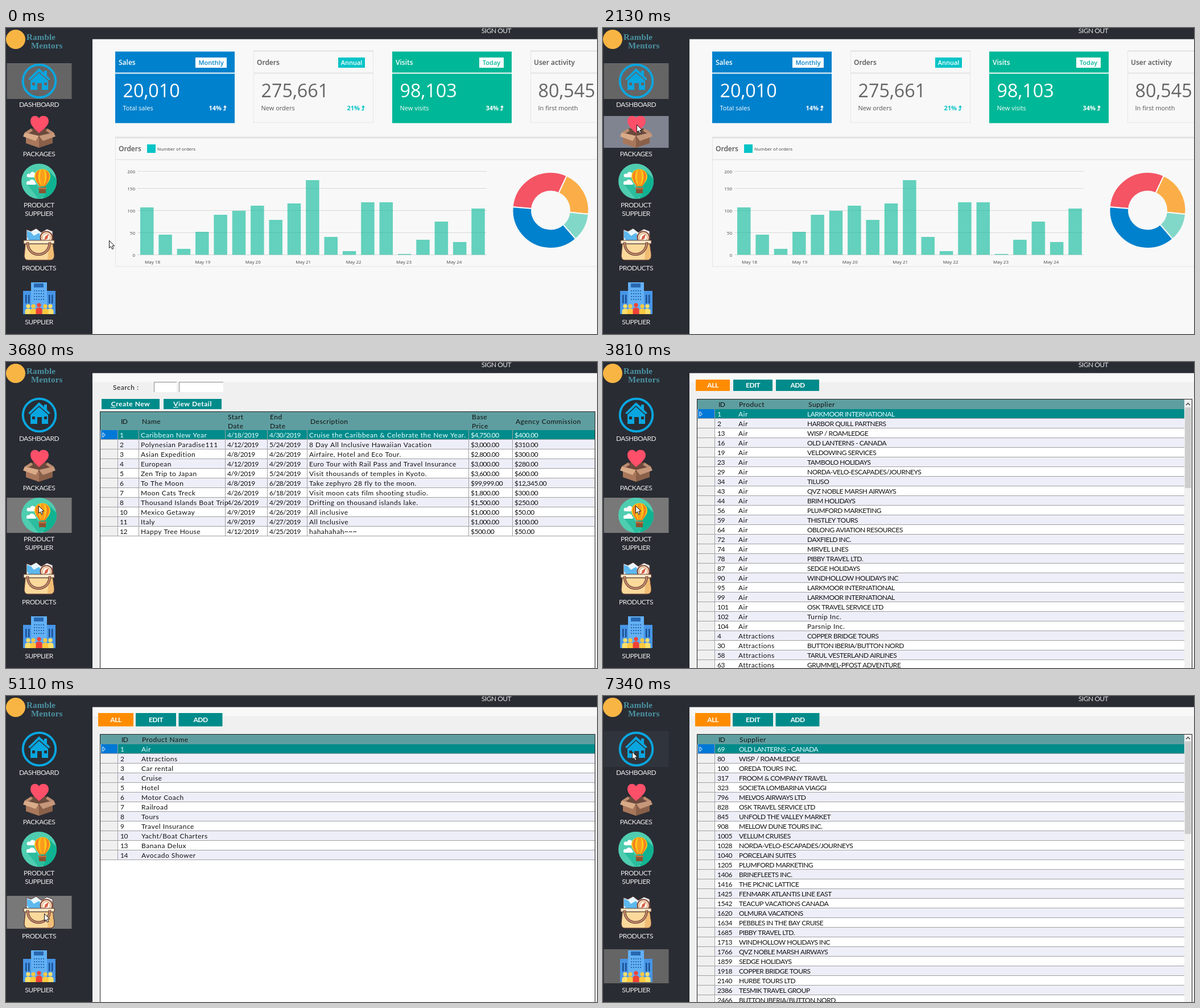
An HTML page with a canvas that plays this animation: 1039 by 539 pixels, repeating every 8000 ms.

```html
<!DOCTYPE html>
<html lang="en">
<head>
<meta charset="utf-8">
<title>Travel agency desktop</title>
<style>
html, body { margin: 0; width: 100%; height: 100%; overflow: hidden; background: #292c33; }
canvas { display: block; }
</style>
</head>
<body>
<canvas id="stage" width="1039" height="539"></canvas>
<script>
const ctx = document.getElementById('stage').getContext('2d');
const LOOP = 8000;
const DARK = '#292c33', TEAL = '#008b8b', BLUE = '#0081cd', GREEN = '#00b797', CYAN = '#06c4c7';

// ---------- drawing helpers ----------
function box(x, y, w, h, color) {
  ctx.fillStyle = color;
  ctx.fillRect(x, y, w, h);
}
function shape(d, fill, stroke, width = 1) {
  const path = new Path2D(d);
  if (fill) { ctx.fillStyle = fill; ctx.fill(path, 'evenodd'); }
  if (stroke) { ctx.strokeStyle = stroke; ctx.lineWidth = width; ctx.stroke(path); }
}
function disc(x, y, r, fill, stroke, width = 1) {
  ctx.beginPath();
  ctx.arc(x, y, r, 0, 7);
  if (fill) { ctx.fillStyle = fill; ctx.fill(); }
  if (stroke) { ctx.strokeStyle = stroke; ctx.lineWidth = width; ctx.stroke(); }
}
function write(s, x, y, font, color, align, spacing) {
  ctx.font = font;
  ctx.fillStyle = color;
  ctx.textAlign = align;
  ctx.letterSpacing = spacing + 'px';
  ctx.fillText(s, x, y);
}
// Geometric interface text: looser lowercase, tighter capitals and digits
function label(s, x, y, color = '#111', weight = 400, align = 'left') {
  write(s, x, y, `${weight} 12px Lato, sans-serif`, color, align, /[a-z]/.test(s) ? 0.5 : -0.5);
}
function sans(s, x, y, size, color, weight = 400, align = 'left') {
  write(s, x, y, `${weight} ${size}px "Open Sans", sans-serif`, color, align, 0);
}

// ---------- sidebar ----------
function homeIcon() {
  disc(58.5, 93.5, 28.8, null, '#0aa6df', 4);
  shape('M58 71 L67 79 V75 H72 V84 L78 90 L75 92 L58 77 L42 92 L39 90 Z', '#0aa6df');
  shape('M58 79 L74 93 V109 H43 V93 Z M55 97 H63 V109 H55 Z M46 96 H51 V101 H46 Z M67 96 H72 V101 H67 Z', '#0aa6df');
}
function packageIcon() {
  shape('M45 177 H72 L85 186 L58 194 L32 186 Z', '#6b4a3d');
  shape('M58 185 C51 178 43 172 43 164 C43 154 54 152 58 159 C62 152 75 154 75 164 C75 172 66 178 58 185 Z', '#ff4f69');
  shape('M35 188 L58 193 V211 L35 203 Z', '#a9775b');
  shape('M82 188 L58 193 V211 L82 203 Z', '#8a6049');
  shape('M33 184 L58 190 L52 199 L30 191 Z', '#d9ab88');
  shape('M84 184 L58 190 L65 199 L87 191 Z', '#c6977a');
  shape('M33 184 L44 177 L47 181 L39 186 Z M84 184 L73 177 L70 181 L78 186 Z', '#bd8d70');
}
function balloonIcon() {
  disc(58, 270, 31, '#4fcdb0');
  ctx.save();
  ctx.beginPath();
  ctx.arc(58, 270, 31, 0, 7);
  ctx.clip();
  shape('M74 251 L100 277 V310 H77 L57 290 Z', '#0fb391');
  shape('M36 274 H51 L70 294 L58 302 Z', '#2cbd9e');
  ctx.restore();
  shape('M37 262 C35 257 41 255 42 258 C43 251 53 253 51 259 C54 260 53 263 51 263 H39 Z', '#fff');
  shape('M37 276 C34 272 38 268 41 270 C43 264 52 268 51 272 C54 273 53 276 51 276 Z', '#fff');
  shape('M59 276 L61 284 M69 276 L67 284', null, '#8a5a3b');
  shape('M50 262 C50 244 78 244 78 262 C78 269 71 275 69 279 H59 C57 275 50 269 50 262 Z', '#ffc61a');
  shape('M55 253 C50 258 51 266 59 279 H62 C55 268 55 257 60 249 Z M73 253 C78 258 77 266 69 279 H66 C73 268 73 257 68 249 Z', '#f5821f');
  shape('M62 249 H66 C69 258 68 270 66 279 H62 C60 270 59 258 62 249 Z', '#fb9d1c');
  box(58, 282, 12, 9, '#8b5330');
  box(57, 281, 14, 3, '#b8713f');
}
function bagIcon() {
  const line = '#5b3a35';
  shape('M36 375 V355 L44 358 L53 353 L62 360 L72 354 L82 358 V377 Z', '#eaf6fd', line);
  shape('M37 369 V357 L44 360 L49 366 L58 361 L64 370 L58 376 H42 Z', '#5db8ee');
  disc(71, 369, 10.5, '#fbe3c2', '#8a4b3a', 2);
  disc(71, 369, 7, '#fff6e6', '#c98b68');
  shape('M75 363 L73 371 L67 374 L69 367 Z', '#d8604c');
  shape('M34 380 H82 L85 400 C85 406 82 409 78 409 H39 C34 409 32 406 32 401 Z', '#fbd99b', line, 1.3);
  shape('M75 381 H82 L84 400 C84 406 81 408 77 408 H73 Z', '#f0bd74');
  shape('M31 374 H85 V380 H31 Z', '#fdebc8', line, 1.2);
  shape('M38 377 C37 406 77 406 77 377', null, line, 4.5);
  shape('M38 377 C37 406 77 406 77 377', null, '#c98a6a', 2.6);
}
function buildingIcon() {
  box(30, 463, 57, 41, '#4795e6');
  box(44, 448, 28, 56, '#62b0f4');
  box(49, 450, 17, 7, '#2868b0');
  for (const x of [34, 39, 75, 80]) box(x, 470, 2.5, 15, '#1d4f8f');
  for (let i = 0; i < 20; i++) box(49 + i % 5 * 4, 462 + Math.floor(i / 5) * 5, 2, 2, '#2868b0');
  for (const [x, y, color] of [[39, 490, '#fde06c'], [78, 490, '#fde06c'], [48, 490, '#fbc840'], [69, 490, '#fbc840'], [58, 488, '#ef4136']]) {
    disc(x, y, 3.6, color);
    shape(`M${x - 5.5} 504 V${y + 8} C${x - 5} ${y + 3} ${x + 5} ${y + 3} ${x + 5.5} ${y + 8} V504 Z`, color);
  }
}
const items = [
  { y: 62, h: 63, icon: homeIcon, names: [['DASHBOARD', 139]] },
  { y: 155, h: 56, icon: packageIcon, names: [['PACKAGES', 226]] },
  { y: 239, h: 62, icon: balloonIcon, names: [['PRODUCT', 316], ['SUPPLIER', 331]] },
  { y: 352, h: 58, icon: bagIcon, names: [['PRODUCTS', 427]] },
  { y: 446, h: 60, icon: buildingIcon, names: [['SUPPLIER', 522]] },
];
function sidebar(tints) {
  box(0, 0, 1039, 19.5, DARK);
  box(0, 0, 152, 539, DARK);
  label('SIGN OUT', 862, 9, '#e4e4e4', 400, 'center');
  disc(17, 20, 17, '#f9b544');
  const brand = 'bold 15px "Liberation Serif", serif';
  write('Ramble', 36, 21, brand, '#4b93a3', 'left', 0.2);
  write('Mentors', 44, 36, brand, '#4b93a3', 'left', 0.2);
  items.forEach((item, i) => {
    if (tints[i]) box(1.5, item.y, 114, item.h, tints[i]);
    item.icon();
    for (const [s, y] of item.names) label(s, 58, y, '#ececec', 400, 'center');
  });
}

// ---------- dashboard ----------
function card(x, title, badge, bw, value, note, pct, color, solid) {
  const ink = solid ? '#fff' : '#555';
  if (solid) box(x, 41.5, 210, 126, color);
  else {
    ctx.strokeStyle = '#e6e6e6';
    ctx.lineWidth = 1;
    ctx.strokeRect(x + .5, 40.5, 210, 126);
    box(x, 39.5, 211, 2, '#e2e2e2');
  }
  box(x, 78.5, 210, 2, solid ? '#f8f8f8' : '#e4e4e4');
  sans(title, x + 6, 65, 12, ink, 600);
  const right = x + 196;
  box(right - bw, 52, bw, 18, solid ? '#fff' : color);
  sans(badge, right - bw / 2, 65, 11, solid ? color : '#fff', 600, 'center');
  sans(value, x + 13.5, 122, 32.3, solid ? '#fff' : '#666');
  sans(note, x + 13.5, 145, 11, ink);
  const tint = solid ? '#fff' : color, ax = x + 192;
  sans(pct, x + 187, 145, 11, tint, 700, 'right');
  shape(`M${ax - 2} 144.5 H${ax + 1} V139`, null, tint, 1.6);
  shape(`M${ax - 2} 140 L${ax + 1} 136 L${ax + 4} 140 Z`, tint);
}
const barTops = [316, 364, 389, 359, 329, 322, 313, 338, 309, 268, 368, 393, 307, 307, 398, 373, 341, 377, 318];
const slices = [['#f45463', -175, -65], ['#fbae47', -65, 6], ['#82d8c8', 6, 49], [BLUE, 49, 185]];

function dashboard() {
  box(152, 19.5, 887, 520, '#f8f8f8');
  card(192, 'Sales', 'Monthly', 55, '20,010', 'Total sales', '14%', BLUE, true);
  card(435, 'Orders', 'Annual', 47, '275,661', 'New orders', '21%', CYAN, false);
  card(679, 'Visits', 'Today', 43, '98,103', 'New visits', '34%', GREEN, true);
  card(922, 'User activity', '', 0, '80,545', 'In first month', '', CYAN, false);

  ctx.strokeStyle = '#e4e4e4';
  ctx.lineWidth = 1;
  ctx.strokeRect(192.5, 193.5, 900, 226.5);
  box(192, 191.5, 847, 3, '#e2e2e2');
  box(192, 231, 847, 1.5, '#e4e4e4');
  sans('Orders', 198, 217, 12, '#555', 600);
  box(248, 205, 15, 15, CYAN);
  sans('Number of orders', 266, 216, 8, '#444');

  [[200, 252], [150, 282], [100, 321], [50, 360], [0, 399]].forEach(([n, y]) => {
    box(231, y, 614, 1, '#d8d8d8');
    sans(n, 227, y + 4, 8, '#444', 400, 'right');
  });
  barTops.forEach((y, i) => box(236 + i * 32.35, y, 23.5, 399.5 - y, 'rgba(0,183,151,.6)'));
  for (let i = 0; i < 7; i++) sans('May ' + (18 + i), 257.5 + i * 88.4, 415, 8, '#444', 400, 'center');

  const rad = Math.PI / 180;
  for (const [color, a, b] of slices) {
    ctx.beginPath();
    ctx.arc(957.5, 321, 67, a * rad, b * rad);
    ctx.arc(957.5, 321, 33.5, b * rad, a * rad, true);
    ctx.closePath();
    ctx.fillStyle = color;
    ctx.fill();
    ctx.strokeStyle = '#f8f8f8';
    ctx.lineWidth = 2;
    ctx.stroke();
  }
}

// ---------- tables ----------
function backdrop() {
  box(152, 19.5, 887, 520, '#f0f0f0');
  box(152, 19.5, 887, 16, '#f8f8f8');
}
function button(s, x, y, w, h, color = TEAL) {
  box(x, y, w, h, color);
  label(s, x + w / 2, y + h / 2 + 4.3, '#fff', 700, 'center');
}
function tabs(x, y, h) {
  const d = 163 - x;
  button('ALL', x, y, 60 + d * 2, h, '#ff8c00');
  button('EDIT', 229 - d, y, 69 + d * 2, h);
  button('ADD', 304 - d / 2, y, 76 + d, h);
}
// cols: [heading, heading x, cell x]; thumb: lower end of the scroll handle
function table(top, first, cols, rows, lines, thumb) {
  const right = thumb ? 1022 : 1035;
  box(165, top, 871, 539 - top, '#222');
  box(166, top + 1, 869, 539, '#fff');
  box(166, top + 1, right - 166, first - top - 1, '#5f9ea0');
  for (const [head, x] of cols) {
    const words = head.split('\n');
    const mid = (top + first) / 2 + 5;
    words.forEach((s, i) => label(s, x, mid + (words.length > 1 ? i * 16 - 8 : 0)));
  }
  rows.forEach((row, i) => {
    const y = first + i * 17;
    box(166, y, right - 166, 17, i === 0 ? TEAL : i % 2 ? '#eeeef9' : '#fff');
    box(166, y, 31, 17, '#f0f0f0');
    box(166, y + 16, right - 166, 1, '#a0a0a0');
    for (const x of lines) box(x, y, 1, 17, '#a0a0a0');
    row.split('|').forEach((s, c) => label(s, cols[c][2], y + 13, i ? '#111' : '#e9ffff'));
  });
  box(167, first, 29, 16, '#0078d7');
  shape(`M170 ${first + 4.5} L174.5 ${first + 8.5} L170 ${first + 12.5} Z`, null, '#fff');
  if (thumb) {
    box(1022, top + 1, 13, 539, '#f0f0f0');
    box(1023, 80, 11, thumb - 80, '#cdcdcd');
    shape('M1025 76 L1028.5 72.5 L1032 76', null, '#444', 1.5);
  }
}

const packageRows = `1|Caribbean New Year|4/18/2019|4/30/2019|Cruise the Caribbean & Celebrate the New Year.|$4,750.00|$400.00
2|Polynesian Paradise111|4/12/2019|5/24/2019|8 Day All Inclusive Hawaiian Vacation|$3,000.00|$310.00
3|Asian Expedition|4/8/2019|4/26/2019|Airfaire, Hotel and Eco Tour.|$2,800.00|$300.00
4|European|4/12/2019|4/29/2019|Euro Tour with Rail Pass and Travel Insurance|$3,000.00|$280.00
5|Zen Trip to Japan|4/9/2019|5/24/2019|Visit thousands of temples in Kyoto.|$3,600.00|$600.00
6|To The Moon|4/8/2019|6/28/2019|Take zephyro 28 fly to the moon.|$99,999.00|$12,345.00
7|Moon Cats Treck|4/26/2019|6/18/2019|Visit moon cats film shooting studio.|$1,800.00|$300.00
8|Thousand Islands Boat Trip|4/26/2019|4/29/2019|Drifting on thousand islands lake.|$1,500.00|$250.00
10|Mexico Getaway|4/9/2019|4/26/2019|All inclusive|$1,000.00|$50.00
11|Italy|4/9/2019|4/27/2019|All Inclusive|$1,000.00|$100.00
12|Happy Tree House|4/12/2019|4/25/2019|hahahahah~~~|$500.00|$50.00`.split('\n');

const offerRows = `1|LARKMOOR INTERNATIONAL
2|HARBOR QUILL PARTNERS
13|WISP / ROAMLEDGE
16|OLD LANTERNS - CANADA
19|VELDOWING SERVICES
23|TAMBOLO HOLIDAYS
29|NORDA-VELO-ESCAPADES/JOURNEYS
34|TILUSO
43|QVZ NOBLE MARSH AIRWAYS
44|BRIM HOLIDAYS
56|PLUMFORD MARKETING
59|THISTLEY TOURS
64|OBLONG AVIATION RESOURCES
72|DAXFIELD INC.
74|MIRVEL LINES
78|PIBBY TRAVEL LTD.
87|SEDGE HOLIDAYS
90|WINDHOLLOW HOLIDAYS INC
95|LARKMOOR INTERNATIONAL
99|LARKMOOR INTERNATIONAL
101|OSK TRAVEL SERVICE LTD
102|Turnip Inc.
104|Parsnip Inc.
4|COPPER BRIDGE TOURS
30|BUTTON IBERIA/BUTTON NORD
58|TARUL VESTERLAND AIRLINES
63|GRUMMEL-PFOST ADVENTURE`.split('\n').map((r, i) => r.replace('|', i < 23 ? '|Air|' : '|Attractions|'));

const productRows = `1|Air
2|Attractions
3|Car rental
4|Cruise
5|Hotel
6|Motor Coach
7|Railroad
8|Tours
9|Travel Insurance
10|Yacht/Boat Charters
13|Banana Delux
14|Avocado Shower`.split('\n');

const supplierRows = `69|OLD LANTERNS - CANADA
80|WISP / ROAMLEDGE
100|OREDA TOURS INC.
317|FROOM & COMPANY TRAVEL
323|SOCIETA LOMBARINA VIAGGI
796|MELVOS AIRWAYS LTD
828|OSK TRAVEL SERVICE LTD
845|UNFOLD THE VALLEY MARKET
908|MELLOW DUNE TOURS INC.
1005|VELLUM CRUISES
1028|NORDA-VELO-ESCAPADES/JOURNEYS
1040|PORCELAIN SUITES
1205|PLUMFORD MARKETING
1406|BRINEFLEETS INC.
1416|THE PICNIC LATTICE
1425|FENMARK ATLANTIS LINE EAST
1542|TEACUP VACATIONS CANADA
1620|OLMURA VACATIONS
1634|PEBBLES IN THE BAY CRUISE
1685|PIBBY TRAVEL LTD.
1713|WINDHOLLOW HOLIDAYS INC
1766|QVZ NOBLE MARSH AIRWAYS
1859|SEDGE HOLIDAYS
1918|COPPER BRIDGE TOURS
2140|HURBE TOURS LTD
2386|TESMIK TRAVEL GROUP
2466|BUTTON IBERIA/BUTTON NORD`.split('\n');

function packages() {
  backdrop();
  label('Search :', 188, 49);
  for (const [x, w] of [[260, 39], [304, 77]]) {
    box(x, 35, w + 1, 18, '#8a8a8a');
    box(x + 1, 36, w, 17, '#fff');
  }
  button('Create New', 168, 65, 102, 18);
  button('View Detail', 277, 65, 102, 18);
  box(184, 79.5, 9, 1, '#fff');
  box(294, 79.5, 9, 1, '#fff');
  table(87, 120, [['ID', 202, 200], ['Name', 239, 237], ['Start\nDate', 390, 389], ['End\nDate', 464, 463],
    ['Description', 535, 533], ['Base\nPrice', 819, 817], ['Agency Commission', 896, 894]],
    packageRows, [196, 233, 385, 459, 529, 813, 890]);
}
function offers() {
  backdrop();
  tabs(163, 31, 20);
  table(65, 83, [['ID', 203, 201], ['Product', 239, 238], ['Supplier', 361, 359]], offerRows, [196], 222);
}
function products() {
  backdrop();
  tabs(162, 30, 23.5);
  table(67, 85, [['ID', 203, 201], ['Product Name', 239, 238]], productRows, [196]);
}
function suppliers() {
  backdrop();
  tabs(162, 30, 23.5);
  table(67, 85, [['ID', 203, 201], ['Supplier', 240, 239]], supplierRows, [196], 243);
}

// ---------- timeline ----------
const pages = [[0, dashboard], [2390, packages], [3810, offers], [5110, products], [6715, suppliers]];
const HOVER = '#808491', PRESSED = '#787878', ACTIVE = '#656565', FAINT = '#30343c';
// [time, sidebar item, background]
const tintSteps = [
  [0, 0, ACTIVE], [2010, 1, HOVER], [2390, 0, ''], [2390, 1, PRESSED], [2650, 1, ACTIVE],
  [2780, 2, HOVER], [3550, 1, ''], [3550, 2, PRESSED], [4060, 2, ACTIVE],
  [4990, 3, HOVER], [5110, 2, ''], [5110, 3, PRESSED], [5530, 3, ACTIVE],
  [6450, 4, HOVER], [6590, 3, ''], [6590, 4, PRESSED], [6965, 4, ACTIVE], [7340, 0, FAINT],
];
// [time, x, y] of the pointer tip
const pointerSteps = [
  [0, 181, 374], [650, 169, 318], [800, 250, 230], [920, 322, 156], [1070, 324, 156],
  [1360, 280, 165], [1480, 205, 172], [1600, 133, 175], [1750, 80, 180], [1870, 34, 195],
  [2010, 50, 180], [2130, 59, 170], [2650, 58, 215], [2780, 57, 253],
  [4060, 55, 285], [4180, 51, 320], [4290, 47, 347], [4450, 71, 365], [4590, 67, 383],
  [5370, 67, 402], [5530, 62, 443], [5670, 60, 460], [5800, 59, 474], [5940, 58, 475],
  [6965, 57, 425], [7090, 55, 310], [7215, 52, 185], [7340, 51, 98],
];
const latest = (steps, t) => steps.filter(s => s[0] <= t).pop();

function pointer(x, y) {
  ctx.save();
  ctx.translate(x + .5, y + .5);
  shape('M0 0 V13 L3 10.3 L5.2 15 L7.4 14 L5.3 9.4 H9.3 Z', '#fff', '#111');
  ctx.restore();
}
function draw(now) {
  const t = now % LOOP;
  const tints = [];
  for (const [at, i, color] of tintSteps) if (at <= t) tints[i] = color;
  latest(pages, t)[1]();
  sidebar(tints);
  const [, x, y] = latest(pointerSteps, t);
  pointer(x, y);
}
let start;
function frame(now) {
  start ??= now;
  draw(now - start);
  requestAnimationFrame(frame);
}
draw(0);
requestAnimationFrame(frame);
</script>
</body>
</html>
```
